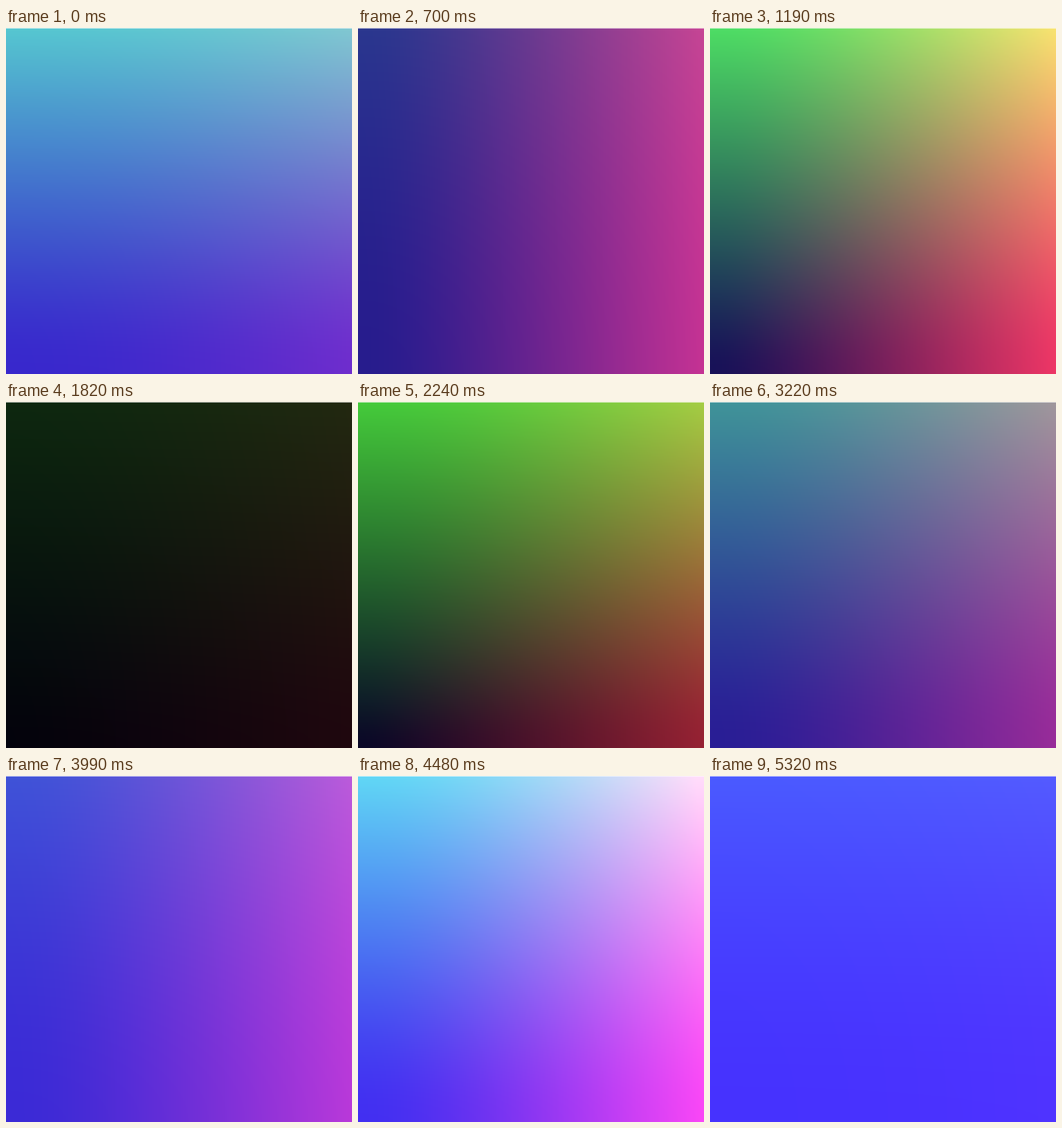
Write an HTML page with a canvas that moves like this. It is 500 by 500 pixels and loops after 5.39 s.

```html
<!DOCTYPE html>
<html lang="en">
<head>
<meta charset="utf-8">
<title>Three lights</title>
<style>
  html, body { margin: 0; width: 100%; height: 100%; overflow: hidden; }
  canvas { display: block; width: 100%; height: 100%; }
  body::before {
    content: "";
    position: fixed;
    inset: 0 0 auto;
    height: 1px;
    background: rgba(255, 255, 255, .6);
  }
</style>
</head>
<body>
<canvas id="stage" width="500" height="500"></canvas>
<script>
  const SIZE = 500, STEP = 70, LOOP = 5390;
  const HELD = [2, 4, 52]; // steps that repeat the one before

  // Each light pulses as peak * |cos(from + speed * t)|, in degrees and seconds.
  const red   = { rgb: [255, 55, 55], peak: .96, from: 67, speed: 107.5 };  // from the right
  const green = { rgb: [85, 255, 55], peak: .93, from: 145, speed: 162.3 }; // from the top
  const blue  = { rgb: [70, 50, 255], peak: 1, from: 37, speed: 27.6 };     // everywhere

  const ctx = document.getElementById("stage").getContext("2d");
  const image = ctx.createImageData(SIZE, SIZE);
  const pixels = image.data.fill(255);

  // Squared channel values, so that lights add up as energy.
  function energy({ rgb, peak, from, speed }, t) {
    const level = peak * Math.cos((from + speed * t) * Math.PI / 180);
    return rgb.map(c => (c * level) ** 2);
  }

  function draw(t) {
    const r = energy(red, t), g = energy(green, t), b = energy(blue, t);
    let i = 0;
    for (let y = 0; y < SIZE; y++) {
      const down = (1 - y / SIZE) ** 2;
      const row = b.map((c, k) => c + g[k] * down);
      for (let x = 0; x < SIZE; x++, i += 4) {
        const across = (x / SIZE) ** 2;
        for (let k = 0; k < 3; k++) {
          pixels[i + k] = Math.sqrt(row[k] + r[k] * across);
        }
      }
    }
    ctx.putImageData(image, 0, 0);
  }

  let start = null, shown = 0;
  function tick(now) {
    start ??= now;
    let step = Math.floor(((now - start) % LOOP) / STEP);
    if (HELD.includes(step)) step--;
    if (step !== shown) {
      shown = step;
      draw(step * STEP / 1000);
    }
    requestAnimationFrame(tick);
  }
  draw(0);
  requestAnimationFrame(tick);
</script>
</body>
</html>
```
